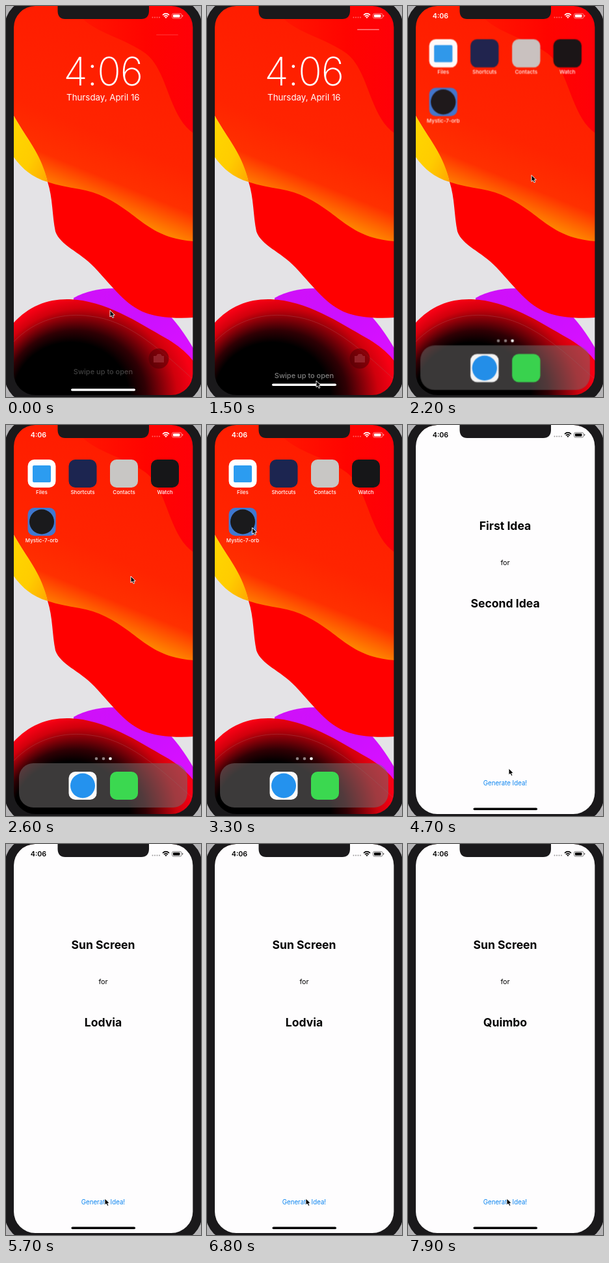
Animation of 300x600 px, one loop 8 s. Source, as an HTML page:

```html
<!DOCTYPE html>
<html lang="en">
<head>
<meta charset="utf-8">
<title>Idea generator</title>
<style>
html, body { margin: 0; width: 100%; height: 100%; overflow: hidden; background: #b4b3b5; }
svg { display: block; width: 300px; height: 600px; }
text { font-family: Inter, "Liberation Sans", sans-serif; text-anchor: middle; }
.title { font-size: 17.6px; font-weight: 700; }
.label { font-size: 8px; font-weight: 500; fill: #fff; }
</style>
</head>
<body>
<svg viewBox="0 0 300 600">
  <defs>
    <clipPath id="screen"><rect x="11" y="-1" width="278" height="599" rx="33"/></clipPath>
    <clipPath id="cardClip"><rect id="cardBox"/></clipPath>
    <linearGradient id="orange" gradientUnits="userSpaceOnUse" x1="190" y1="40" x2="88" y2="290">
      <stop offset="0" stop-color="#ff1c00"/><stop offset=".6" stop-color="#ff2400"/>
      <stop offset=".82" stop-color="#ff3000"/><stop offset=".98" stop-color="#ff8200"/>
    </linearGradient>
    <linearGradient id="yellow" x1="0" y1="0" x2="1" y2="1">
      <stop offset="0" stop-color="#ffd800"/><stop offset=".6" stop-color="#fc0"/><stop offset="1" stop-color="#ffa800"/>
    </linearGradient>
    <linearGradient id="wave" x1="0" y1="0" x2="1" y2="0">
      <stop offset="0" stop-color="#ff1800"/><stop offset=".6" stop-color="#ff0400"/><stop offset="1" stop-color="#ff0008"/>
    </linearGradient>
    <linearGradient id="purple" x1="0" y1="0" x2="1" y2="1">
      <stop offset="0" stop-color="#d010f8"/><stop offset=".5" stop-color="#cc10ff"/><stop offset="1" stop-color="#e010ff"/>
    </linearGradient>
    <radialGradient id="dune" gradientUnits="userSpaceOnUse" cx="0" cy="0" r="1" fx="-.33" fy="0"
      gradientTransform="translate(125 600) scale(165 155)">
      <stop offset="0"/><stop offset=".54"/><stop offset=".66" stop-color="#300004"/>
      <stop offset=".77" stop-color="#800008"/><stop offset=".88" stop-color="#d0000c"/><stop offset="1" stop-color="#f80014"/>
    </radialGradient>
    <filter id="blur" x="-20%" y="-20%" width="140%" height="140%"><feGaussianBlur id="blurSize" stdDeviation="0"/></filter>
    <g id="signal" fill="currentColor">
      <g opacity=".4"><circle cx="225.5" cy="17.5" r="1"/><circle cx="229" cy="17.5" r="1"/><circle cx="232.500" cy="17.5" r="1"/><circle cx="236" cy="17.5" r="1"/></g>
      <g fill="none" stroke="currentColor" stroke-width="1.7"><path d="M241 13.800Q246 9.500 251 13.800M243 16Q246 13.400 249 16"/></g>
      <path d="M244.300 17.200Q246 16 247.700 17.200L246 19Z"/>
      <rect x="255.500" y="11.500" width="14.500" height="7.500" rx="2.200" fill="none" stroke="currentColor" stroke-opacity=".5"/>
      <rect x="257" y="13" width="10.500" height="4.500" rx="1"/>
      <rect x="271" y="13.700" width="1.200" height="3" rx=".6" opacity=".6"/>
    </g>
  </defs>

  <g clip-path="url(#screen)">
    <g id="wallpaper">
      <rect width="300" height="600" fill="#e4e3e6"/>
      <path d="M104 448C130 434 160 431 188 435C230 443 264 484 288 525V570H104Z" fill="url(#purple)"/>
      <path d="M10 0H290V478C262 480 235 478 215 471C185 460 165 432 136 401C112 376 84 368 76 346C71 322 72 294 64 270Z" fill="#f00"/>
      <path d="M10 0H290V361C240 358 218 338 190 317C164 298 142 286 113 281C95 278 79 275 64 270C52 225 30 202 10 165Z" fill="url(#orange)"/>
      <path d="M10 165C30 202 54 225 64 270C42 264 24 250 10 229Z" fill="url(#yellow)"/>
      <path d="M104 0C122 40 175 44 215 73C250 100 250 172 290 196V0Z" fill="url(#wave)"/>
      <path d="M10 488C35 460 65 449 98 450C155 452 205 487 250 512Q276 528 290 547V600H10Z" fill="url(#dune)"/>
      <path d="M10 517C45 480 90 470 130 476C185 482 230 520 290 575" fill="none" stroke="#b06060" stroke-opacity=".35"/>
    </g>

    <g id="home">
      <g id="apps"></g>
      <g fill="#fff"><circle cx="139" cy="512" r="2.300" opacity=".5"/><circle cx="150" cy="512" r="2.300" opacity=".5"/><circle cx="160.500" cy="512" r="2.300"/></g>
      <rect x="20" y="519" width="259" height="68" rx="22" fill="#747070" fill-opacity=".52"/>
      <g id="dock"></g>
    </g>
    <rect id="dim" width="300" height="600" fill="#282828"/>
    <g id="topBar" color="#fff">
      <use href="#signal"/>
      <text id="homeTime" x="50" y="19" font-size="10.700" font-weight="600" fill="#fff">4:06</text>
    </g>

    <g id="lock" fill="#fff">
      <text x="149.200" y="122" font-size="60.500" font-weight="200" letter-spacing="-1">4:06</text>
      <text x="149.300" y="145" font-size="13.300">Thursday, April 16</text>
      <circle cx="235" cy="541" r="15.500" fill="#500006" fill-opacity=".55"/>
      <path d="M227 537H231L233 534H238L240 537H243V547H227Z" fill="#a03038" fill-opacity=".7"/>
      <rect id="grabber" x="231" width="34" height="1.500" rx=".7"/>
      <text id="hint" x="149.500" font-size="11" font-weight="500">Swipe up to open</text>
      <rect id="lockBar" x="100" width="99" height="3.600" rx="1.800"/>
    </g>

    <g id="card" clip-path="url(#cardClip)">
      <rect width="300" height="600" fill="#fefdfe"/>
      <g id="page" color="#000">
        <use href="#signal"/>
        <text x="50" y="19" font-size="10.700" font-weight="600">4:06</text>
        <g id="words">
          <text id="first" class="title" x="149.500" y="161"></text>
          <text x="149.500" y="215" font-size="10.800">for</text>
          <text id="second" class="title" x="149.500" y="280"></text>
          <text id="button" x="149.500" y="553" font-size="9.700" fill="#0a84f0">Generate Idea!</text>
        </g>
        <rect x="100.500" y="587.500" width="98.500" height="3.600" rx="1.800"/>
      </g>
    </g>
  </g>

  <path fill="#1a191b" fill-rule="evenodd" d="M40-10H260A42 42 0 0 1 302 32V568A42 42 0 0 1 260 610H40A42 42 0 0 1-2 568V32A42 42 0 0 1 40-10Z
    M45 0A33 33 0 0 0 12 33V564A33 33 0 0 0 45 597H254.400A33 33 0 0 0 287.400 564V33A33 33 0 0 0 254.400 0H220V8Q219.500 20 208 20H91Q80 20 79.500 8V0Z"/>
  <path id="cursor" d="M0 0V10L2.300 8L4 11.500L5.800 10.700L4.300 7.300H7.300Z" fill="#000" stroke="#fff" stroke-width=".9"/>
</svg>
<script>
const LOOP = 8000, STEP = 100;
const $ = id => document.getElementById(id);
const set = (id, attrs) => { for (const k in attrs) $(id).setAttribute(k, attrs[k]); };
const tile = (x, y, fill, inner = '', label = '') =>
  `<rect x="${x}" y="${y}" width="43" height="43" rx="10" fill="${fill}"/>${inner}` +
  `<text class="label" x="${x + 21.5}" y="${y + 53}">${label}</text>`;
const disc = (x, y, r, fill) => `<circle cx="${x}" cy="${y}" r="${r}" fill="${fill}"/>`;

$('apps').innerHTML =
  tile(33.500, 53, '#fff', '<rect x="41" y="62" width="28" height="26" rx="2" fill="#2c9cf0"/>', 'Files') +
  tile(96.500, 53, '#1c2550', '', 'Shortcuts') +
  tile(160, 53, '#c8c6c4', '', 'Contacts') +
  tile(223, 53, '#161618', '', 'Watch') +
  tile(33.500, 127, '#3f78d0', disc(55, 148.500, 19, '#1a1a1c'), 'Mystic-7-orb');
$('dock').innerHTML =
  tile(96.500, 532, '#fafafa', disc(118, 553.500, 19, '#2492ee')) +
  tile(160, 532, '#3bd850');

// Linear interpolation through [time, value...] points
function track(t, points) {
  let i = points.findIndex(p => p[0] > t);
  if (i < 0) return points.at(-1).slice(1);
  if (i === 0) return points[0].slice(1);
  const a = points[i - 1], b = points[i], u = (t - a[0]) / (b[0] - a[0]);
  return a.slice(1).map((v, k) => v + (b[k + 1] - v) * u);
}
const clamp = v => Math.max(0, Math.min(1, v));
const mix = (a, b, u) => a + (b - a) * u;
const around = (x, y, s) => `translate(${x} ${y}) scale(${s}) translate(${-x} ${-y})`;

const cursorPath = [[100, 160, 467], [600, 163, 500], [1200, 168, 578], [1500, 168, 575], [1900, 184, 330],
  [2300, 192, 236], [2600, 192, 232], [2800, 175, 222], [3200, 72, 160], [3400, 67, 155], [4200, 67, 155],
  [4500, 154, 524], [4600, 154, 524], [4700, 155, 527], [5000, 152, 544]];

function drawLock(t) {
  const up = clamp((t - 1500) / 500), rise = 1 - (1 - up) ** 2;
  const [hintY, hintAlpha, grabY, grabAlpha] =
    track(t, [[100, 564.500, .25, 43.500, .15], [1000, 570.500, .5, 35.500, .5]]);
  const [barY] = track(t, [[1200, 587.200], [1500, 579.500]]);
  set('lock', { transform: `translate(0 ${-420 * rise})`, opacity: 1 - up, display: up < 1 ? 'inline' : 'none' });
  set('hint', { y: hintY, opacity: hintAlpha });
  set('grabber', { y: grabY, opacity: grabAlpha });
  set('lockBar', { y: barY });
}

function drawHome(t, open) {
  const show = clamp((t - 1700) / 700), ease = 1 - (1 - show) ** 3;
  set('home', {
    opacity: ease * (1 - .35 * open),
    transform: around(150, 300, mix(1.35, 1, ease) - .03 * open),
    filter: open > 0 ? 'url(#blur)' : 'none'
  });
  set('wallpaper', { filter: open > 0 ? 'url(#blur)' : 'none' });
  set('blurSize', { stdDeviation: 7 * open });
  set('dim', { opacity: .6 * open });
  set('homeTime', { opacity: ease });
  set('topBar', { opacity: 1 - .95 * open });
}

function drawCard(t, u) {
  set('card', { display: u > 0 ? 'inline' : 'none', opacity: clamp(u * 4) });
  const p = 1 - (1 - u) ** 3.15;
  const x = mix(33.500, 11.500, p), width = mix(43, 277, p);
  const y = mix(127, 0, 1 - (1 - u) ** 1.95), height = mix(43, 598, 1 - (1 - u) ** 2.5);
  const s = width / 277;
  set('cardBox', { x, y, width, height, rx: mix(10, 33, p) });
  set('page', { transform: `translate(${x - 11.500 * s} ${y}) scale(${s})` });
  set('words', { opacity: track(t, [[3500, 0], [3600, .03], [3700, .25], [4000, 1]])[0] });
  set('button', { opacity: track(t, [[5100, 1], [5200, .25], [5300, .25], [5600, 1],
    [7300, 1], [7400, .25], [7500, .25], [7900, 1]])[0] });
  $('first').textContent = t < 5300 ? 'First Idea' : 'Sun Screen';
  $('second').textContent = t < 5300 ? 'Second Idea' : t < 7500 ? 'Lodvia' : 'Quimbo';
}

function draw(now) {
  const t = Math.floor(now % LOOP / STEP) * STEP;
  const u = clamp((t - 3400) / 500), open = 1 - (1 - u) ** 3.15;
  drawLock(t);
  drawHome(t, open);
  drawCard(t, u);
  set('cursor', { transform: `translate(${track(t, cursorPath)})` });
}

const start = performance.now();
function loop() {
  draw(performance.now() - start);
  requestAnimationFrame(loop);
}
loop();
</script>
</body>
</html>
```
